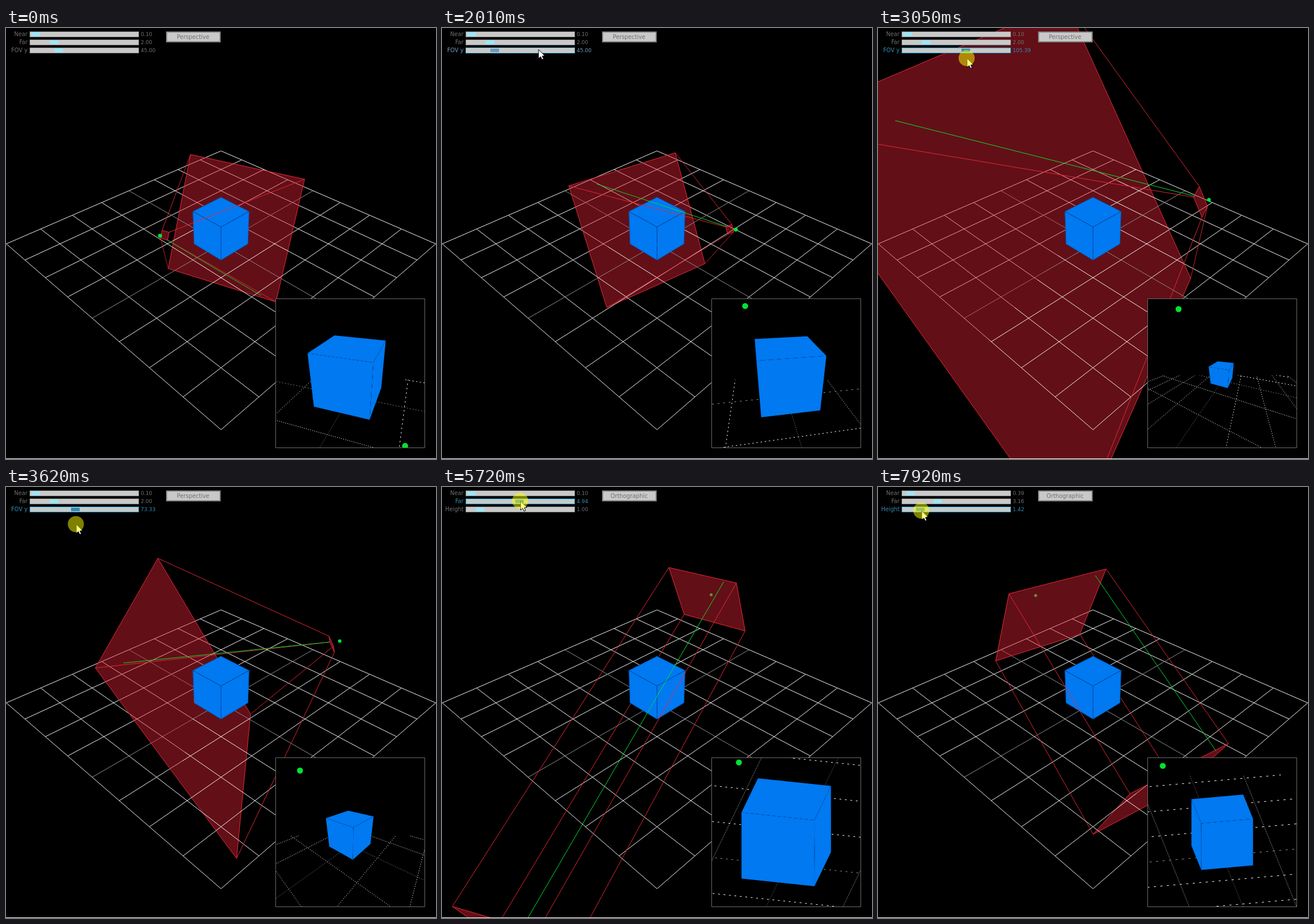
Animation, 747 px wide and 749 px high, one loop 8 s. Source, as an HTML page with a canvas:

```html
<!DOCTYPE html>
<html lang="en">
<head>
<meta charset="utf-8">
<title>Camera frustum</title>
<style>
  html, body { margin: 0; width: 100%; height: 100%; overflow: hidden; background: #000; }
  canvas { display: block; }
</style>
</head>
<body>
<canvas id="stage" width="747" height="749"></canvas>
<script>
const ctx = document.getElementById('stage').getContext('2d');
const LOOP = 8000, STEP = 95.362;
const RED = 'rgb(230,41,55)', GREEN = 'rgb(0,228,48)', BLUE = 'rgb(0,121,241)';
const INSET = { x: 468, y: 470, size: 260 };
const THEME = {
  normal: { border: '#838383', base: '#c9c9c9', text: '#707070', knob: '#97e8ff' },
  focused: { border: '#5bb2d9', base: '#c9effe', text: '#6c9bbc', knob: '#6c9bbc' },
  pressed: { border: '#0492c7', base: '#97e8ff', text: '#368baf', knob: '#368baf' }
};

// ---- Pointer: time, x, y ----
const POINTER = [
  [0, 646, 737], [560, 646, 737], [570, 240, 4], [860, 105, 60], [1300, 52, 95],
  [1720, 105, 50], [2005, 167, 37], [2150, 167, 38], [2575, 111.41, 44.5], [3000, 155, 52],
  [3500, 121.36, 64], [3750, 121.36, 65], [4100, 322, 16], [4260, 322, 16], [4958, 111.5, 19.5],
  [5010, 113, 21], [5150, 140, 23], [5500, 165, 24], [5950, 105.15, 24], [6080, 105.15, 24],
  [6579, 68, 19.5], [6780, 46, 11], [6900, 46, 12], [7350, 57.51, 12], [7470, 57.51, 12],
  [7700, 68, 39], [7915, 75.22, 41], [8000, 76, 41]
];
const PRESSES = [[2110, 3750], [4160, 4260], [4930, 6080], [6840, 7470], [7700, LOOP]];
const POINTER_SHOWN = 570, ORTHO_START = 4260;

const within = (t, [start, end]) => t >= start && t < end;
const mix = (a, b, k) => a + (b - a) * k;

function pointerAt(t) {
  const i = Math.max(1, POINTER.findIndex(key => key[0] >= t));
  const a = POINTER[i - 1], b = POINTER[i];
  const k = (t - a[0]) / (b[0] - a[0]), eased = k * k * (3 - 2 * k);
  return { x: mix(a[1], b[1], eased), y: mix(a[2], b[2], eased) };
}

// ---- Sliders: knob offset = (value - min) * scale ----
const SLIDERS = {
  near: { label: 'Near', y: 6, start: 0.1, min: 0, low: 0.1, scale: 17.2, left: 42, drag: [6840, 7470] },
  far: { label: 'Far', y: 20, start: 2, min: 0, low: 0.2, scale: 17.2, left: 42, drag: [5000, 6080] },
  fov: { label: 'FOV y', y: 34, start: 45, min: 5, low: 5, scale: 1.018, left: 43, drag: [2110, 3750] },
  height: { label: 'Height', y: 34, start: 1, min: 0, low: 0.1, scale: 17.2, left: 42, drag: [7700, LOOP] }
};

function sliderValue({ start, min, low, scale, left, drag }, t) {
  if (t < drag[0]) return start;
  return Math.max(low, (pointerAt(Math.min(t, drag[1])).x - left - 8.8) / scale + min);
}

// ---- Vectors and cameras ----
const dot = (a, b) => a[0] * b[0] + a[1] * b[1] + a[2] * b[2];
const add = (a, b, k = 1) => a.map((v, i) => v + b[i] * k);
const lerp = (a, b, k) => a.map((v, i) => mix(v, b[i], k));
const cross = (a, b) => [a[1] * b[2] - a[2] * b[1], a[2] * b[0] - a[0] * b[2], a[0] * b[1] - a[1] * b[0]];

function lookAt(pos, target) {
  const offset = add(target, pos, -1), length = Math.hypot(...offset);
  const dir = offset.map(v => v / length), flat = Math.hypot(dir[0], dir[2]);
  const right = [-dir[2] / flat, 0, dir[0] / flat];
  return { pos, dir, right, up: cross(right, dir) };
}
const depthIn = (cam, p) => dot(add(p, cam.pos, -1), cam.dir);

const mainCam = lookAt([4, 4, 4], [0, 0, 0]);
function projectMain(p) {
  const v = add(p, mainCam.pos, -1), k = 913.7 / dot(v, mainCam.dir);
  return [373.5 + dot(v, mainCam.right) * k, 375.1 - dot(v, mainCam.up) * k];
}

// ---- Scene ----
const GRID = [];
for (let i = -4; i <= 4; i++) {
  const c = i / 2, color = i ? '#f0f0f0' : '#8a8a8a';
  GRID.push({ color, ends: [[c, 0, -2], [c, 0, 2]] }, { color, ends: [[-2, 0, c], [2, 0, c]] });
}
const BOX_MIN = [-0.25, 0, -0.25], BOX_MAX = [0.25, 0.5, 0.25];
const CORNERS = [[-1, -1], [1, -1], [1, 1], [-1, 1]];
const FACES = [0, 1, 2].flatMap(axis => [-1, 1].map(side => {
  const normal = [0, 0, 0];
  normal[axis] = side;
  const points = CORNERS.map(([u, v]) => {
    const p = [0, 0.25, 0];
    p[axis] += side / 4;
    p[(axis + 1) % 3] += u / 4;
    p[(axis + 2) % 3] += v / 4;
    return p;
  });
  return { normal, points };
}));

function clip(points, value, closed) {
  const out = [];
  points.forEach((a, i) => {
    const b = points[i + 1] || (closed && points[0]), va = value(a);
    if (va >= 0) out.push(a);
    if (!b) return;
    const vb = value(b);
    if ((va >= 0) !== (vb >= 0)) out.push(lerp(a, b, va / (va - vb)));
  });
  return out;
}
const clipSlab = (points, cam, [lo, hi], closed) =>
  clip(clip(points, p => depthIn(cam, p) - lo, closed), p => hi - depthIn(cam, p), closed);

function behindBox(p) {
  let enter = 1e-3, leave = 1;
  for (let i = 0; i < 3; i++) {
    const d = mainCam.pos[i] - p[i];
    const a = (BOX_MIN[i] - p[i]) / d, b = (BOX_MAX[i] - p[i]) / d;
    enter = Math.max(enter, Math.min(a, b));
    leave = Math.min(leave, Math.max(a, b));
  }
  return enter < leave;
}

// ---- Drawing helpers ----
function trace(points, closed) {
  ctx.beginPath();
  points.forEach(p => ctx.lineTo(...p));
  if (closed) ctx.closePath();
}
// A thin line sampled at every third row shows only in the middle third of each pixel it crosses.
function setSampledDash([a, b]) {
  const delta = [b[0] - a[0], b[1] - a[1]], size = delta.map(Math.abs);
  const minor = size[0] < size[1] ? 0 : 1, major = size[1 - minor] || 1;
  const period = Math.min(200, Math.max(3, major / (size[minor] || 1)));
  const along = period * Math.hypot(...delta) / major;
  const drift = delta[minor] > 0 ? a[minor] - 1 / 3 : 2 / 3 - a[minor];
  ctx.setLineDash([along / 3, along * 2 / 3]);
  ctx.lineDashOffset = (drift - Math.floor(drift)) * along;
}
function strokeLine(points, color, sampled) {
  if (points.length < 2) return;
  if (sampled) setSampledDash(points);
  trace(points);
  ctx.strokeStyle = color;
  ctx.stroke();
  ctx.setLineDash([]);
}
function disc(x, y, r, color) {
  ctx.beginPath();
  ctx.arc(x, y, r, 0, 2 * Math.PI);
  ctx.fillStyle = color;
  ctx.fill();
}
function visibleLine(a, b, color) {
  const pieces = 120;
  ctx.beginPath();
  let drawing = false;
  for (let i = 0; i <= pieces; i++) {
    const p = lerp(a, b, i / pieces), shown = !behindBox(p);
    if (shown) ctx[drawing ? 'lineTo' : 'moveTo'](...projectMain(p));
    drawing = shown;
  }
  ctx.strokeStyle = color;
  ctx.stroke();
}
function drawWorld(cam, slab, eye, project, sampled) {
  for (const { ends, color } of GRID) {
    strokeLine(clipSlab(ends, cam, slab).map(project), color, sampled);
  }
  const faces = FACES.filter(f => dot(f.normal, add(eye, f.points[0], -1)) > 0);
  for (const { points } of faces) {
    const shape = clipSlab(points, cam, slab, true).map(project);
    if (shape.length < 3) continue;
    trace(shape, true);
    ctx.fillStyle = ctx.strokeStyle = BLUE;
    ctx.fill();
    if (!sampled) ctx.stroke();
  }
  const edgeColor = `rgba(0,62,135,${sampled ? 0.45 : 0.6})`;
  for (const { points } of faces) {
    points.forEach((p, i) => {
      const edge = clipSlab([p, points[(i + 1) % 4]], cam, slab);
      strokeLine(edge.map(project), edgeColor, sampled);
    });
  }
}

// ---- Views ----
function drawMain(view) {
  const { cam, near, far, pointAt, ndc } = view;
  const quadAt = d => CORNERS.map(([x, y]) => pointAt(x, y, d));
  const nearQuad = quadAt(near), farQuad = quadAt(far);
  const world = slab => drawWorld(cam, slab, mainCam.pos, projectMain);
  const plane = quad => () => {
    trace(quad.map(projectMain), true);
    ctx.fillStyle = 'rgba(230,35,55,.43)';
    ctx.fill();
    ctx.strokeStyle = RED;
    ctx.stroke();
  };
  const before = () => {
    world([-1e3, near]);
    if (behindBox(cam.pos)) return;
    disc(...projectMain(cam.pos), 0.0205 * 913.7 / depthIn(mainCam, cam.pos), GREEN);
  };
  const middle = () => {
    world([near, far]);
    nearQuad.forEach((p, i) => visibleLine(p, farQuad[i], RED));
    visibleLine(pointAt(...ndc, near), pointAt(...ndc, far), GREEN);
  };
  const beyond = () => world([far, 1e3]);
  const nearPlane = plane(nearQuad), farPlane = plane(farQuad);

  // Paint the slabs and planes from back to front as seen by the main camera.
  const eye = depthIn(cam, mainCam.pos);
  const order = eye < near ? [beyond, farPlane, middle, nearPlane, before]
    : eye > far ? [before, nearPlane, middle, farPlane, beyond]
    : [before, nearPlane, beyond, farPlane, middle];
  order.forEach(draw => draw());
}

function drawInset({ cam, near, far, halfAt, ortho, ndc }) {
  const { x, y, size } = INSET, half = size / 2;
  const toInset = (u, v) => [x + half + u * half, y + half - v * half];
  const project = p => {
    const v = add(p, cam.pos, -1), k = halfAt(dot(v, cam.dir));
    return toInset(dot(v, cam.right) / k, dot(v, cam.up) / k);
  };
  ctx.save();
  ctx.beginPath();
  ctx.rect(x, y, size, size);
  ctx.clip();
  ctx.fillStyle = '#000';
  ctx.fillRect(x, y, size, size);
  drawWorld(cam, [near, far], ortho ? add(cam.pos, cam.dir, -1e4) : cam.pos, project, true);
  disc(...toInset(...ndc), 5.2, GREEN);
  ctx.restore();
  ctx.strokeStyle = '#6a6a6a';
  ctx.strokeRect(x + 0.5, y + 0.5, size - 1, size - 1);
}

function frame(x, y, w, h, border, fill, line) {
  ctx.fillStyle = border;
  ctx.fillRect(x, y, w, h);
  ctx.fillStyle = fill;
  ctx.fillRect(x + line, y + line, w - 2 * line, h - 2 * line);
}
function text(string, x, y, color, align, size) {
  ctx.font = `${size}px "DejaVu Sans", sans-serif`;
  ctx.textAlign = align;
  ctx.fillStyle = color;
  ctx.fillText(string, x, y);
}

function drawControls(t, pointer, ortho, values) {
  const pressed = PRESSES.some(p => within(t, p));
  const over = (x, y, w, h) => t >= POINTER_SHOWN && pointer.x >= x && pointer.x < x + w &&
    pointer.y >= y && pointer.y < y + h;

  for (const name of ['near', 'far', ortho ? 'height' : 'fov']) {
    const { label, y, min, scale, left, drag } = SLIDERS[name], value = values[name];
    const state = within(t, drag) ? 'pressed' : !pressed && over(42, y, 189, 10) ? 'focused' : 'normal';
    const theme = THEME[state];
    frame(41, y, 190, 10, theme.border, '#c9c9c9', 1);
    ctx.fillStyle = theme.knob;
    ctx.fillRect(Math.min(215, Math.round(left + (value - min) * scale)), y + 2, 15, 6);
    text(label, 37.5, y + 8, theme.text, 'right', 9.7);
    text(value.toFixed(2), 234, y + 8, theme.text, 'left', 9);
  }

  const hover = over(278, 6, 95, 18);
  const theme = THEME[hover ? (pressed ? 'pressed' : 'focused') : 'normal'];
  frame(278, 6, 95, 19, theme.border, theme.base, 2);
  text(ortho ? 'Orthographic' : 'Perspective', 325, 18.5, theme.text, 'center', 9.8);

  if (t < POINTER_SHOWN) return;
  const arrow = [[0, 0], [0, 15.5], [3.6, 12.3], [6, 17.5], [8.6, 16.4], [6.3, 11.3], [11, 11]];
  trace(arrow.map(([x, y]) => [pointer.x + x + 0.8, pointer.y + y + 0.5]), true);
  ctx.fillStyle = '#fff';
  ctx.fill();
  ctx.strokeStyle = '#000';
  ctx.stroke();
  if (pressed) disc(pointer.x, pointer.y, 14, 'rgba(255,255,0,.5)');
}

function draw(t) {
  const pointer = pointerAt(t), ortho = t >= ORTHO_START, values = {};
  for (const name in SLIDERS) values[name] = sliderValue(SLIDERS[name], t);
  const { near, far, fov, height } = values;

  const angle = (19.2 + 0.03033 * t) * Math.PI / 180;
  const cam = lookAt([Math.SQRT2 * Math.sin(angle), 1, Math.SQRT2 * Math.cos(angle)], [0, 0.25, 0]);
  const halfAt = d => ortho ? height / 2 : d * Math.tan(fov * Math.PI / 360);
  const pointAt = (x, y, d) =>
    add(add(add(cam.pos, cam.dir, d), cam.right, x * halfAt(d)), cam.up, y * halfAt(d));
  const ndc = [(pointer.x + 1.5) / 747 * 2 - 1, 1 - (pointer.y + 1) / 749 * 2];
  const view = { cam, near, far, ortho, halfAt, pointAt, ndc };

  ctx.lineWidth = 1;
  ctx.lineJoin = 'round';
  ctx.fillStyle = '#000';
  ctx.fillRect(0, 0, 747, 749);
  drawMain(view);
  drawInset(view);
  drawControls(t, pointer, ortho, values);
  ctx.fillStyle = '#fff';
  ctx.fillRect(0, 748, 747, 1);
}

const started = performance.now();
function tick() {
  const t = (performance.now() - started) % LOOP;
  draw(Math.floor((t + 5) / STEP) * STEP);
  requestAnimationFrame(tick);
}
tick();
</script>
</body>
</html>
```
